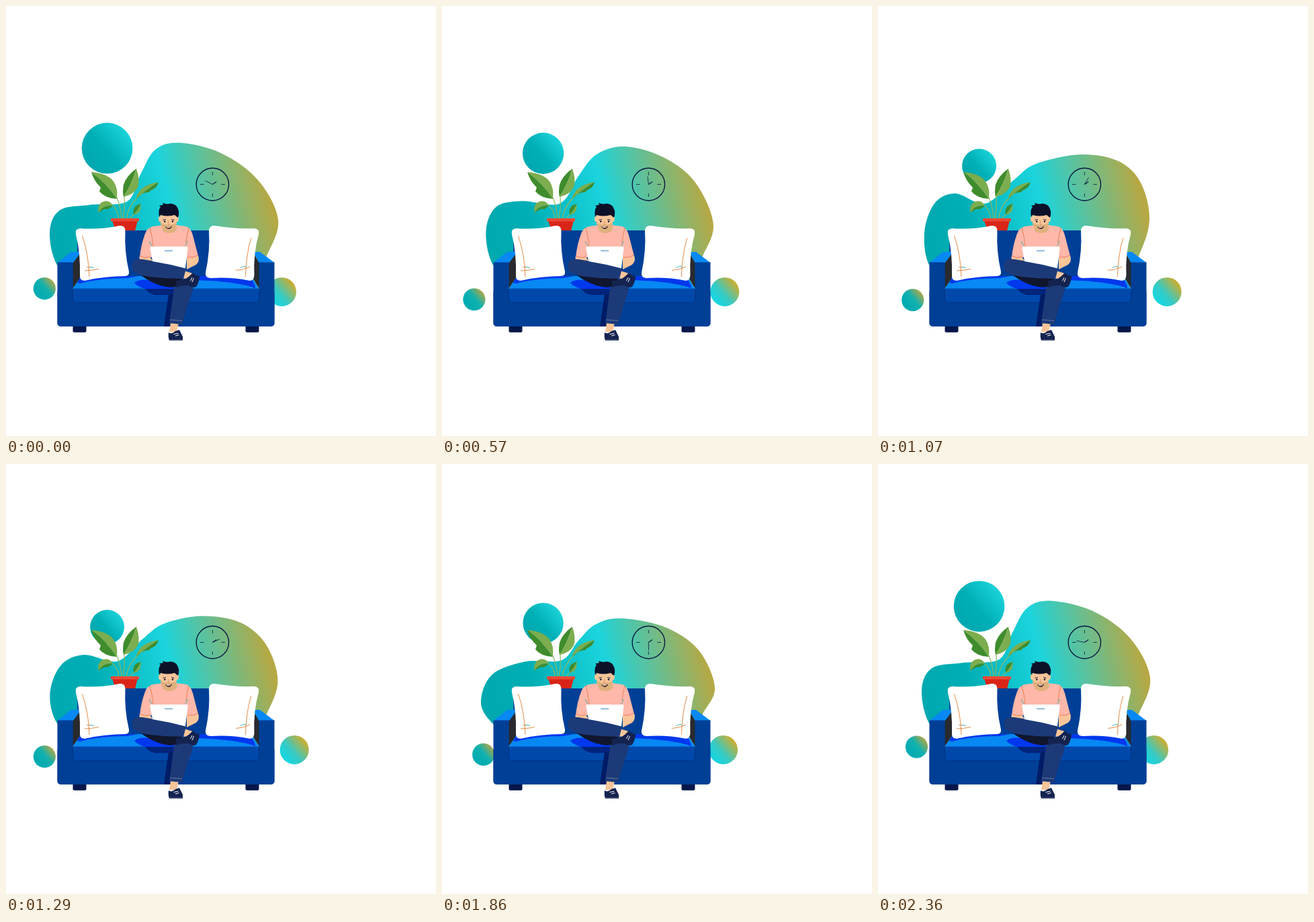
Animation, 640 px wide and 640 px high, one loop 2430 ms. Source, as an HTML page with a canvas:

```html
<!DOCTYPE html>
<html lang="en">
<head>
<meta charset="utf-8">
<title>Working on the sofa</title>
<style>
html, body { margin: 0; width: 100%; height: 100%; overflow: hidden; background: #fff; }
canvas { display: block; }
</style>
</head>
<body>
<canvas id="stage" width="640" height="640"></canvas>
<script>
const ctx = document.getElementById('stage').getContext('2d');
const LOOP = 2430, FPS = 14;

// Key times and the values each moving part passes through.
const TIMES = [0, 290, 790, 1070, 1500, 1860, 2360];
const BALL_Y = [211.7, 213.5, 225.3, 238, 243.8, 236.7, 211.7];
const BALL_R = [37.9, 35.3, 27.3, 25.5, 26.2, 30.2, 37.9];
const LEFT_X = [57.3, 51.5, 46.7, 51.7, 62, 61.7, 57.5];
const LEFT_Y = [420.5, 431, 439.5, 437.6, 433.6, 432.4, 421];
const RIGHT_X = [410.5, 414.5, 425.8, 430.2, 426.5, 418.6, 410.6];
const HAND = [297, 340, 363, 391, 465, 540, 642];

// Upper outline of the background blob, left to right, as x, y pairs.
const REST = [65, 338, 80, 304, 125, 296, 180, 291, 200, 251, 222, 214, 258, 203.6, 320, 219, 375, 259, 405, 318];
const BLOB = [
  REST,
  [65, 338, 81, 302, 125, 294.5, 179, 292, 201, 253, 224, 216, 262, 205, 322, 221, 375, 259, 405, 318],
  [66, 338, 79, 298, 113, 286.3, 171, 295, 204, 254, 234, 226, 281, 213, 335, 227, 378, 262, 403, 326],
  [69, 338, 84, 294, 115, 279, 160, 294, 202, 259, 235, 235, 302, 221, 358, 231, 391, 263, 404, 318],
  [61, 349, 78, 307, 118, 290.5, 174, 293, 204, 262, 234, 239, 276, 230, 335, 240, 381, 274, 405, 328],
  [58, 356, 74, 314, 123, 294.3, 178, 292, 202, 264, 228, 239, 265, 229.6, 330, 242, 381, 276, 406, 332],
  REST
];
const BASE = [388, 372, 360, 420, 120, 420, 78, 389];

// Periodic cubic through the keys; turn is added after each loop.
function sample(vals, t, turn = 0) {
  const n = TIMES.length;
  const wrap = i => Math.floor(i / n);
  const time = i => TIMES[(i + n) % n] + LOOP * wrap(i);
  const val = i => vals[(i + n) % n] + turn * wrap(i);
  const slope = i => (val(i + 1) - val(i - 1)) / (time(i + 1) - time(i - 1));
  let i = n - 1;
  while (TIMES[i] > t) i--;
  const d = time(i + 1) - time(i), u = (t - time(i)) / d, w = 1 - u;
  return val(i) * w * w * (1 + 2 * u) + val(i + 1) * u * u * (3 - 2 * u)
    + d * u * w * (w * slope(i) - u * slope(i + 1));
}

function gradient(x0, y0, x1, y1, stops) {
  const g = ctx.createLinearGradient(x0, y0, x1, y1);
  stops.forEach(([at, color]) => g.addColorStop(at, color));
  return g;
}

function fill(color, d) {
  ctx.fillStyle = color;
  ctx.fill(new Path2D(d));
}

function line(color, width, d) {
  ctx.strokeStyle = color;
  ctx.lineWidth = width;
  ctx.stroke(new Path2D(d));
}

function box(color, x, y, w, h, r = 0) {
  ctx.fillStyle = color;
  ctx.beginPath();
  ctx.roundRect(x, y, w, h, r);
  ctx.fill();
}

function dot(color, x, y, rx, ry = rx, turn = 0) {
  ctx.fillStyle = color;
  ctx.beginPath();
  ctx.ellipse(x, y, rx, ry, turn, 0, 7);
  ctx.fill();
}

function ball(x, y, r, stops) {
  dot(gradient(x - r * .6, y + r * .5, x + r * .75, y - r * .65, stops), x, y, r);
}

function blob(t) {
  const p = REST.map((_, k) => sample(BLOB.map(row => row[k]), t)).concat(BASE);
  const n = p.length / 2;
  const X = i => p[(i + n) % n * 2], Y = i => p[(i + n) % n * 2 + 1];
  ctx.fillStyle = gradient(72, 350, 388, 268, [[0, '#00a9b0'], [.2, '#00aeb5'], [.55, '#1bd4dd'], [1, '#b6a843']]);
  ctx.beginPath();
  ctx.moveTo(X(0), Y(0));
  for (let i = 0; i < n; i++) {
    ctx.bezierCurveTo(
      X(i) + (X(i + 1) - X(i - 1)) / 6, Y(i) + (Y(i + 1) - Y(i - 1)) / 6,
      X(i + 1) - (X(i + 2) - X(i)) / 6, Y(i + 1) - (Y(i + 2) - Y(i)) / 6,
      X(i + 1), Y(i + 1));
  }
  ctx.fill();
}

function clock(angle) {
  const ink = '#0b1840', x = 307.4, y = 265.5, a = angle * Math.PI / 180;
  ctx.strokeStyle = ink;
  ctx.lineWidth = 1.4;
  ctx.beginPath();
  ctx.arc(x, y, 24.2, 0, 7);
  ctx.stroke();
  line(ink, .8, 'M307.4 247v5M307.4 279v5M289 265.5h5.5M320.500 265.500h5.500');
  line(ink, 1.2, `M${x} ${y}L313.200 261.500`);
  line(ink, .8, `M${x} ${y}l${12 * Math.sin(a)} ${-12 * Math.cos(a)}`);
}

function plant() {
  const light = '#7cad4e', dark = '#3f8c2d';
  line('#8fb860', 1.2, 'M165 285Q171 300 172 317M176 283Q177 302 174 317M195 286Q182 298 179 317M157 296Q167 302 168 317M191 310Q186 313 185 317');
  fill(light, 'M127 247Q151 249 160 261Q167 271 165 287Q151 265 127 247Z');
  fill(dark, 'M127 247Q131 261 141 270L139 276Q147 286 165 287Q151 265 127 247Z');
  fill(dark, 'M194 242Q179 253 175 266Q173 277 175 284Q187 266 194 242Z');
  fill(light, 'M194 242Q200 260 196 270Q190 281 175 284Q187 266 194 242Z');
  fill(light, 'M227 262Q209 265 201 273Q194 281 194 287Q209 273 227 262Z');
  fill(dark, 'M227 262Q225 271 216 274L213 277Q202 277 194 287Q209 273 227 262Z');
  fill(light, 'M138 308Q135 295 145 291Q154 288 159 297Q146 295 138 308Z');
  fill(dark, 'M138 308Q142 297 159 297Q153 304 147 302Q142 304 138 308Z');
  fill(dark, 'M190 311Q188 301 194 297L201 294Q197 303 190 311Z');
  fill(light, 'M190 311Q198 309 200 303L201 294Q197 303 190 311Z');
  fill('#d92518', 'M158 319H196L192 335H163Z');
  box('#ec4934', 156, 316, 42, 4.5, 1);
}

function sofa() {
  const body = '#003f96', top = '#0788f3', shade = '#0038ed';
  box('#06174a', 99.500, 474, 20, 11.700, 2);
  box('#06174a', 356.500, 474, 20, 11.700, 2);
  box(body, 106, 334, 262, 80, 5);
  fill('#292a2e', 'M99 382L111 366V404L99 421ZM377 382L367 366V404L377 421Z');
  fill(top, 'M76.500 382L97 366H112L100 382ZM399.500 382L378 366H368L376.500 382Z');
  box(body, 76.500, 381.500, 23.200, 95.500, [0, 0, 5, 5]);
  box(body, 376.500, 381.500, 23, 95.500, [0, 0, 5, 5]);
  box(body, 76.500, 421, 323, 56, 5);
  fill(top, 'M112 402H365L377 421H99Z');
  box('#0049ab', 99.500, 420.500, 277, 20.700, [0, 0, 6, 6]);
  line('#00317f', .9, 'M99.500 421V435Q99.500 441.500 106 441.500H370Q376.500 441.500 376.500 435V421');
  fill(shade, 'M112 402H196L181 405Q140 405 110 413L106 412Z');
  fill(shade, 'M278 402H361Q370 411 371 420Q345 410 284 408Z');
  fill(shade, 'M191 412Q197 406 214 408L258 414L252 422H210Q196 418 191 412Z');
  fill('#00237b', 'M207 421H254L250 430H222Q212 428 207 421Z');
  fill('#001c66', 'M242 429H252L246 477H235Z');
}

function pillows() {
  fill('#fff', 'M110 331Q140 333 169 327Q177 326 177.500 334Q176 366 183 395Q184 402 177 402Q148 402 119 408.500Q110 410 110 402Q111 368 104 340Q102 332 110 331Z');
  fill('#fff', 'M311 327Q340 332 370 331Q378 332 376 340Q368 368 369.500 401Q369 410 361 408.500Q335 403 304 405Q296 404 297 397Q304 365 302 334Q303 326 311 327Z');
  const seam = '#e58b45';
  line(seam, 1, 'M113.500 342Q123 370 124 403M117 394Q126 394 138 391.500M120 388L125 389');
  line(seam, 1, 'M364.800 345Q357 372 356.500 403M342 393.500Q353 393 363 388');
  line('#3fafb0', 1, 'M124 388.500Q128 388 131 390M349 389.500Q353 386.500 358 388');
}

function man() {
  const skin = '#f8c599', shirt = '#ffb8a9', navy = '#1d3a78', deep = '#10162e', shoe = '#14234f';
  // Torso and arms
  fill(skin, 'M199 372L214 373L222 386L202 381Q197 379 199 372ZM269 372L286 371Q289 380 283 385L269 392Z');
  fill(shirt, 'M219 328L234 326H253L268 328Q275 330 278 341L286 372Q277 378 268 374H214Q206 376 199 374Q201 355 207 339Q210 330 219 328Z');
  line('#e77954', .9, 'M214 330Q218 344 219 358M272 330Q269 342 268 352M199 372Q207 376 214 373M270 374Q279 375 286 371');
  line('#4aa9a1', 1, 'M213 350L217 357M270.500 350L267 357');
  // Head
  fill('#dfb07b', 'M232 322H254V331Q253 338 243 338Q233 338 232 330Z');
  dot(skin, 229, 317, 2, 4);
  dot(skin, 255, 317, 2, 4);
  fill(skin, 'M230 309H254V323Q253 335 242 335.500Q232 335 230 323Z');
  fill('#deb07c', 'M230 322Q234 326 242 325.500Q250 326 254 322Q253 335 242 335.500Q232 335 230 322Z');
  fill('#0c1129', 'M228 314Q226 304 230 299L228 297L234 296L233 293Q239 296 245 294Q253 295 255 300Q259 307 256 315Q253 313 251 311Q240 314 230 311Z');
  line('#25223a', 1, 'M233.500 318.500L238 317.700M246 317.700L250.500 318.500');
  dot('#1c1c2c', 236.300, 320.800, 1.300);
  dot('#1c1c2c', 248, 320.800, 1.300);
  line('#cd8e62', .9, 'M242 320L241 325H243.500');
  fill('#512e31', 'M237 328Q242 330 247 327.500Q246 332 242 332Q238 331 237 328Z');
  line('#fff', .9, 'M239 329.100Q242 330 245 328.800');
  // Standing leg
  fill(skin, 'M245 472H257L254 485H243Z');
  fill(navy, 'M252 405L281 407Q277 430 270 446L262 474L243 472L249 428Z');
  line('#8196ae', .7, 'M244 467L262 468.500');
  fill(shoe, 'M242 486Q247 489 252 484L258 482L263 492V497.700H243Q241 493 242 486Z');
  line('#fff', 1, 'M249.500 488.500L256.500 487.200M252 491L257.500 489.500');
  line('#667a91', .7, 'M243 497H262');
  // Crossed leg
  fill(deep, 'M201 401L265 403L253 417Q248 420 239 418Q220 415 201 401Z');
  fill(skin, 'M265 394L278 398L274 407L263 405Z');
  fill(navy, 'M188 382Q190 376 203 377Q232 381 268 391L264 406Q239 406 214 403Q199 401 190 395Q186 390 188 382Z');
  fill(shoe, 'M253 409Q267 408 273 402L278 397Q283 402 288 402Q288 410 283 418Q278 420 272 416Q264 415 253 419Z');
  line('#fff', 1, 'M277 404L274.500 409M279.500 405L277 411');
  // Laptop
  fill('#fff', 'M216 358H269Q271 358 270.500 361L267 390.500Q243 384 218 380L214.500 361Q214 358 216 358Z');
  box('#a5c4df', 236, 363, 12.500, 2.500, 1);
}

function draw(t) {
  ctx.fillStyle = '#fff';
  ctx.fillRect(0, 0, 640, 640);
  blob(t);
  ball(150.6, sample(BALL_Y, t), sample(BALL_R, t), [[0, '#00a9b1'], [.4, '#00b0b7'], [1, '#1bd2d9']]);
  ball(sample(LEFT_X, t), sample(LEFT_Y, t), 16.6, [[0, '#00abb2'], [.5, '#12b1ae'], [1, '#a9a84b']]);
  ball(sample(RIGHT_X, t), 425.4, 21.5, [[0, '#1bd4dd'], [.35, '#38cac3'], [1, '#cfad2c']]);
  clock(sample(HAND, t, 360));
  plant();
  sofa();
  pillows();
  man();
}

const start = performance.now();
function tick() {
  const t = (performance.now() - start) % LOOP;
  const step = Math.floor((t + 5) * FPS / 1000) % 34;
  draw(step * 1000 / FPS);
  requestAnimationFrame(tick);
}
tick();
</script>
</body>
</html>
```
